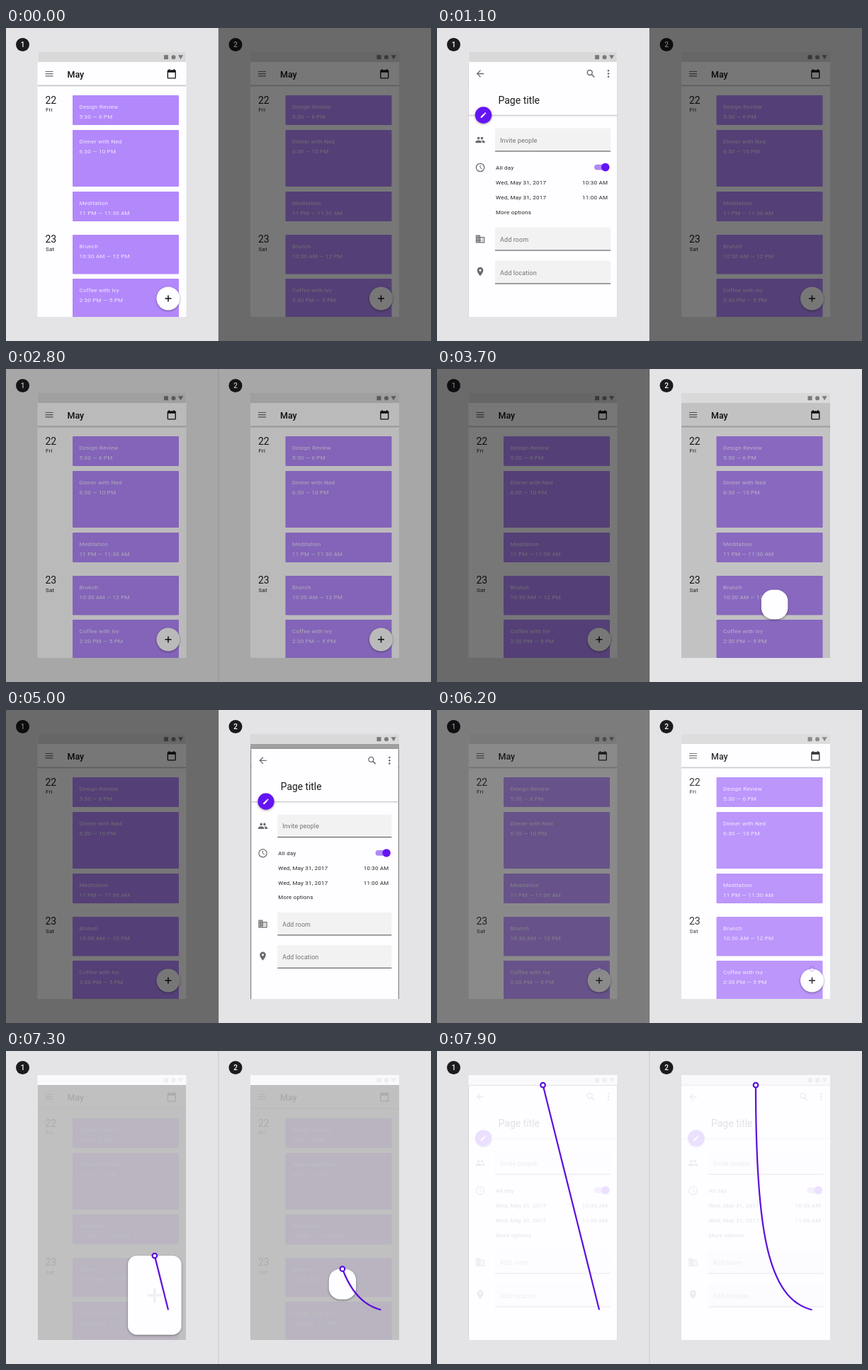
Write an HTML page that moves like this. It is 600 px wide and 442 px high and loops after 8 s.

```html
<!DOCTYPE html>
<html lang="en">
<head>
<meta charset="utf-8">
<title>Arc motion comparison</title>
<style>
  html, body { margin: 0; width: 100%; height: 100%; overflow: hidden; background: #e4e3e5; }
  svg { display: block; width: 600px; height: 442px; font-family: Roboto, Arial, sans-serif; }
  .small { font-size: 8px; letter-spacing: .25px; }
  .label { font-size: 9px; letter-spacing: .12px; fill: #737273; }
  .surface { filter: drop-shadow(0 1.2px 1.8px rgba(0, 0, 0, .4)); }
</style>
</head>
<body>
<svg id="stage" viewBox="0 0 600 442"></svg>
<script>
const LOOP = 8000, STEP = 100;
const PHONE = { x: 44.5, y: 48, w: 210, h: 360 };
const FAB = { cx: 229, cy: 382, size: 33 };
const ACCENT = '#6414f4', TRAIL = '#5a10dc';
const DIM = 0.53, SCRIM = 0.37, WASH = 0.88;

const clamp = v => Math.min(1, Math.max(0, v));
const span = (t, from, to) => clamp((t - from) / (to - from));
const lerp = (a, b, k) => a + (b - a) * k;
const ease = x => x < 0.5 ? 4 * x ** 3 : 1 - 4 * (1 - x) ** 3;

const rect = (x, y, w, h, fill, more = '') =>
  `<rect x="${x}" y="${y}" width="${w}" height="${h}" fill="${fill}" ${more}/>`;
const circle = (x, y, r, fill, more = '') =>
  `<circle cx="${x}" cy="${y}" r="${r}" fill="${fill}" ${more}/>`;
const text = (x, y, s, more = 'class="small" fill="#222"') =>
  `<text x="${x}" y="${y}" ${more}>${s}</text>`;
const line = (d, color, width) =>
  `<path d="${d}" fill="none" stroke="${color}" stroke-width="${width}"/>`;
// Icons are drawn on a 24-unit grid centred on (cx, cy).
const icon = (cx, cy, scale, fill, d) =>
  `<path transform="translate(${cx} ${cy}) scale(${scale}) translate(-12 -12)" fill="${fill}" fill-rule="evenodd" d="${d}"/>`;

const ICONS = {
  calendar: 'M19 4h-1V2h-2v2H8V2H6v2H5a2 2 0 0 0-2 2v14a2 2 0 0 0 2 2h14a2 2 0 0 0 2-2V6a2 2 0 0 0-2-2zM19 20H5V9h14z',
  back: 'M20 11H7.8l5.6-5.6L12 4l-8 8 8 8 1.4-1.4L7.8 13H20z',
  people: 'M16 11a3 3 0 1 0 0-6 3 3 0 0 0 0 6zM8 11a3 3 0 1 0 0-6 3 3 0 0 0 0 6zM8 13c-2.3 0-7 1.2-7 3.5V19h14v-2.5C15 14.200 10.300 13 8 13zM16 13l-1 .05c1.200.8 2 2 2 3.450V19h6v-2.500C23 14.200 18.300 13 16 13z',
  building: 'M12 7V3H2v18h20V7zM6 19H4v-2h2zM6 15H4v-2h2zM6 11H4V9h2zM6 7H4V5h2zM10 19H8v-2h2zM10 15H8v-2h2zM10 11H8V9h2zM10 7H8V5h2zM20 19h-8v-2h2v-2h-2v-2h2v-2h-2V9h8zM18 11h-2v2h2zM18 15h-2v2h2z',
  pin: 'M12 2a7 7 0 0 0-7 7c0 5.200 7 13 7 13s7-7.800 7-13a7 7 0 0 0-7-7zM12 11.500a2.500 2.500 0 1 1 0-5 2.500 2.500 0 0 1 0 5z',
  pencil: 'M3 17.200V21h3.800L17.800 9.900l-3.700-3.700zM20.700 7a1 1 0 0 0 0-1.400l-2.300-2.300a1 1 0 0 0-1.400 0l-1.800 1.800 3.700 3.700z'
};

const EVENTS = [
  [95, 42, 'Design Review', '5:30 — 6 PM'],
  [144, 80, 'Dinner with Ned', '6:30 — 10 PM'],
  [231, 42, 'Meditation', '11 PM — 11:30 AM'],
  [292, 55.5, 'Brunch', '10:30 AM — 12 PM'],
  [354, 56, 'Coffee with Ivy', '2:30 PM — 5 PM']
];
const DAYS = [[107, '22', 'Fri'], [303.3, '23', 'Sat']];

function calendar() {
  const soft = 'class="small" fill="#fff" fill-opacity=".82"';
  return rect(44.5, 34, 210, 14, '#dad9da')
    + rect(223, 38.2, 6, 6, '#7b7a7b') + circle(236.5, 41.2, 3, '#7b7a7b')
    + '<path d="M243 38.300h7.200l-3.600 6z" fill="#7b7a7b"/>'
    + rect(44.5, 80.5, 210, 1.5, '#c9c8ca') + rect(44.5, 82, 210, 1, '#efeeef')
    + line('M55.500 61.500h11M55.500 64.700h11M55.500 67.900h11', '#6b6a6b', 1.2)
    + text(86.5, 69.5, 'May', 'font-size="12.5" font-weight="500" fill="#111"')
    + icon(233.8, 64.8, 0.68, '#151515', ICONS.calendar)
    + DAYS.map(([y, num, day]) =>
        text(55.5, y, num, 'font-size="14" fill="#1c1c1c"') + text(56, y + 11.2, day)).join('')
    + EVENTS.map(([y, h, name, time]) =>
        rect(94, y, 150, h, '#b388fb', 'rx="1.200"')
        + text(103.5, y + 18.8, name, soft) + text(103.5, y + 32.8, time, soft)).join('');
}

function field(y, label) {
  return rect(82, y, 163, 33, '#f3f2f3', 'rx="1.500"') + rect(82, y + 32, 163, 1, '#4a494a')
    + text(89, y + 20, label, 'class="label"');
}

function detailPage() {
  const gray = '#6b6a6b';
  return icon(61, 64.5, 0.65, gray, ICONS.back)
    + `<circle cx="215.700" cy="63" r="3.500" fill="none" stroke="${gray}" stroke-width="1.400"/>`
    + line('M218.200 65.500l4 4', gray, 1.6)
    + [60.2, 64.5, 68.8].map(y => circle(242, y, 1.3, gray)).join('')
    + text(86.5, 106.8, 'Page title', 'font-size="14" fill="#1c1c1c"')
    + rect(44.5, 122.7, 210, 1.5, '#cfced0') + rect(44.5, 124.2, 210, 1.2, '#eeedef')
    + circle(65.5, 123, 11.7, ACCENT, 'class="surface"') + icon(65.5, 123, 0.42, '#fff', ICONS.pencil)
    + icon(61, 158, 0.6, gray, ICONS.people) + field(141.5, 'Invite people')
    + `<circle cx="61" cy="197" r="5.700" fill="none" stroke="${gray}" stroke-width="1.200"/>`
    + line('M61 193.500v3.800l2.700 1.600', gray, 1)
    + text(83, 199.8, 'All day')
    + rect(222, 192.7, 20, 7.8, '#b08af6', 'rx="3.900"') + circle(237.7, 196.6, 5.8, ACCENT)
    + text(83, 220.8, 'Wed, May 31, 2017') + text(205, 220.8, '10:30 AM')
    + text(83, 241.8, 'Wed, May 31, 2017') + text(205, 241.8, '11:00 AM')
    + text(83, 262.8, 'More options')
    + icon(61, 298, 0.62, gray, ICONS.building) + field(281.5, 'Add room')
    + icon(61, 344, 0.62, gray, ICONS.pin) + field(328.5, 'Add location');
}

function panel(i) {
  const arc = i ? 'C165.500 350 149.500 250' : 'L';
  return `<g transform="translate(${i * 300.5} 0)">
    <clipPath id="screen${i}">${rect(PHONE.x, PHONE.y, PHONE.w, PHONE.h, '#fff')}</clipPath>
    <clipPath id="box${i}"><rect id="boxShape${i}"/></clipPath>
    <clipPath id="phone${i}">${rect(44.5, 34, 210, 374, '#fff')}</clipPath>
    ${rect(44.5, 34, 210, 374, '#fefdff')}
    <g id="calendar${i}" clip-path="url(#phone${i})">${calendar()}</g>
    <g clip-path="url(#screen${i})">
      <rect id="scrim${i}" x="44.500" y="48" width="210" height="360"/>
      <rect id="surface${i}" class="surface" fill="#fefdff"/>
      <g clip-path="url(#box${i})">
        <path id="plus${i}" d="M-4.500 0h9M0 -4.500v9" stroke="#111" stroke-width="1.500"/>
        <g id="page${i}">${detailPage()}</g>
      </g>
    </g>
    ${circle(23.5, 23.5, 9.5, '#1b1a1d')}
    ${text(23.5, 27, i + 1, 'font-size="10" font-weight="500" fill="#fff" text-anchor="middle"')}
  </g>
  <rect id="dim${i}" x="${i * 300}" width="300" height="442"/>
  <g id="guide${i}" transform="translate(${i * 300.5} 0)">
    <path id="path${i}" d="M229 365.500${arc} 149.500 48" fill="none" stroke="${TRAIL}" stroke-width="2.200"/>
    <circle id="ring${i}" r="3.300" fill="#fff" stroke="${TRAIL}" stroke-width="2.200"/>
  </g>`;
}

document.getElementById('stage').innerHTML =
  rect(0, 0, 600, 442, '#e4e3e5') + panel(0) + panel(1) + rect(299.5, 0, 1, 442, '#000', 'opacity=".120"');

const el = id => document.getElementById(id);
const set = (id, attrs) => {
  for (const name in attrs) el(id).setAttribute(name, attrs[name]);
};

function drawPanel(i, p, wash, dim) {
  const path = el('path' + i), length = path.getTotalLength();
  const travelled = length * ease(p);
  const top = path.getPointAtLength(travelled);
  // The curved variant moves first and grows later.
  const grow = ease(i ? span(p, 0.26, 0.93) : p);
  const w = lerp(FAB.size, PHONE.w, grow), h = lerp(FAB.size, PHONE.h, grow);
  const x = top.x - w / 2, k = w / PHONE.w;
  const box = { x, y: top.y, width: w, height: h, rx: lerp(FAB.size / 2, 0, grow) };
  const ink = 1 - WASH * wash;

  set('surface' + i, box);
  set('boxShape' + i, box);
  set('calendar' + i, { opacity: ink });
  set('scrim' + i, { opacity: SCRIM * clamp(p / 0.6) });
  set('plus' + i, {
    transform: `translate(${top.x} ${top.y + h / 2}) scale(${w / FAB.size})`,
    opacity: ink * (1 - span(p, 0.1, i ? 0.37 : 0.6))
  });
  set('page' + i, {
    transform: `translate(${x} ${top.y}) scale(${k}) translate(${-PHONE.x} ${-PHONE.y})`,
    opacity: ink * span(p, 0.45, 0.75)
  });
  set('dim' + i, { opacity: dim });
  set('guide' + i, { opacity: wash });
  set('ring' + i, { cx: top.x, cy: top.y });
  path.setAttribute('stroke-dasharray', `${travelled} ${length + 10}`);
}

function render(t) {
  const swap = span(t, 2500, 3100), wash = span(t, 6150, 6500);
  const replay = span(t, 6880, 7952);
  const left = span(t, 350, 1100) - span(t, 1900, 2480) + replay;
  const right = span(t, 3450, 4100) - span(t, 4900, 5480) + replay;
  drawPanel(0, left, wash, DIM * (swap - wash));
  drawPanel(1, right, wash, DIM * (1 - swap));
}

const start = performance.now();
function tick() {
  const t = (performance.now() - start) % LOOP;
  render(Math.floor(t / STEP) * STEP);
  requestAnimationFrame(tick);
}
tick();
</script>
</body>
</html>
```
